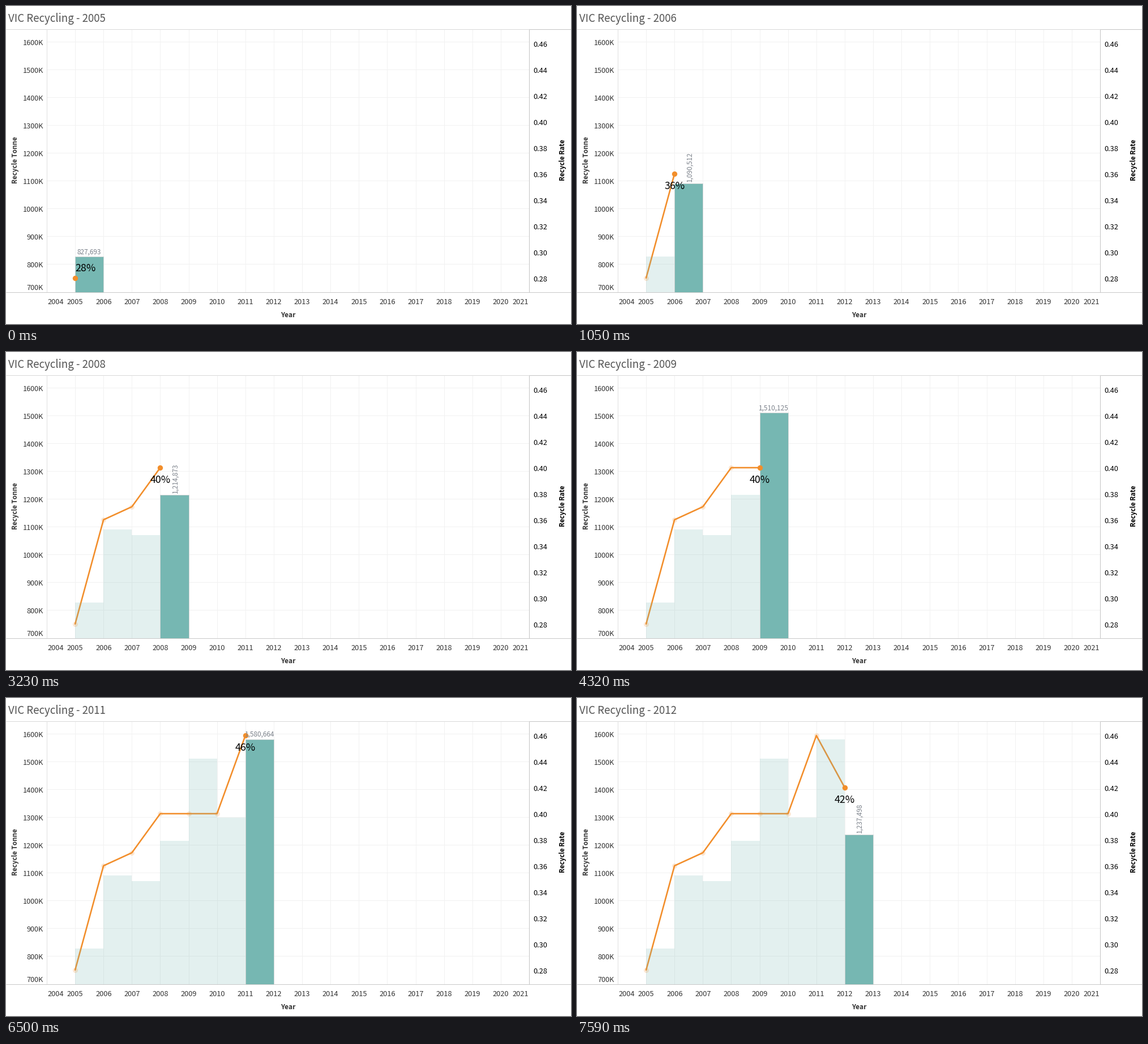
These frames come from a looping animation (998x561 px, 8000 ms). A matplotlib script:

```python
import matplotlib.pyplot as plt
from matplotlib.animation import FuncAnimation
from matplotlib.patches import Rectangle

W, H, DPI = 998, 561, 100
PT = 72 / DPI                      # points per pixel
STEP, LOOP = 20, 8000              # ms
FIRST_HOLD, HOLD = 1050, 1090      # ms each year stays
LEFT, RIGHT, TOP, BASE = 72, 924, 40.5, 504.5
START, END = 2004, 2021

TEAL, ORANGE = "#76b7b2", "#f28e2b"
FONT = "Noto Sans CJK JP"

TONNES = [827693, 1090512, 1069807, 1214873,
          1510125, 1299382, 1580664, 1237498]
RATES = [28, 36, 37, 40, 40, 40, 46, 42]
FIRST_YEAR = 2005


def year_x(year):
    return LEFT + (year - START) * (RIGHT - LEFT) / (END - START)


def tonne_y(tonnes):
    return BASE - (tonnes - 700000) / 100000 * 49.04


def rate_y(percent):
    return 479.7 - (percent - 28) * 22.97


fig = plt.figure(figsize=(W / 100, H / 100), dpi=DPI, facecolor="white")
ax = fig.add_axes([0, 0, 1, 1])
ax.set_xlim(0, W)
ax.set_ylim(H, 0)
ax.axis("off")


def rule(x0, y0, x1, y1, color, z=0):
    ax.plot([x0, x1], [y0, y1], color=color, lw=PT, zorder=z,
            solid_capstyle="butt")


def place(artist, x, y, upright=False):
    """Centre the digit height of a text on (x, y)."""
    drop = 0.37 * artist.get_fontsize() / PT
    artist.set_position((x + drop, y) if upright else (x, y + drop))
    artist.set_rotation(90 if upright else 0)


def label(x, y, text, size, color="#333333", ha="center", weight="medium",
          upright=False, z=6):
    artist = ax.text(0, 0, text, fontsize=size * PT, color=color, ha=ha,
                     va="baseline", family=FONT, weight=weight,
                     rotation_mode="anchor", zorder=z)
    place(artist, x, y, upright)
    return artist


# Grid and frame
for k in range(800, 1601, 100):
    rule(LEFT, tonne_y(k * 1000), RIGHT, tonne_y(k * 1000), "#f1f1f1")
for year in range(START + 1, END):
    rule(year_x(year), TOP, year_x(year), BASE, "#f1f1f1")
rule(0, TOP, RIGHT, TOP, "#d9d9d9", 1)
rule(RIGHT, TOP, W, TOP, "#c4c4c4", 1)
rule(LEFT, TOP, LEFT, BASE, "#dedede", 1)
rule(RIGHT, TOP, RIGHT, BASE, "#c4c4c4", 1)
rule(0, BASE, W, BASE, "#c8c8c8", 5)

# Axis text
for k in range(700, 1601, 100):
    y = 496.5 if k == 700 else tonne_y(k * 1000) + 1.3
    label(66, y, f"{k}K", 12.7, ha="right")
for percent in range(28, 47, 2):
    label(931, rate_y(percent) + 1.2, f"{percent / 100:.2f}", 12.8,
          "black", ha="left")
for year in range(START, END + 1):
    shift = {START: 15.3, END: -15.3}.get(year, 0)
    label(year_x(year) + shift, 521, str(year), 12.8)
label(498, 545, "Year", 12, weight="bold")
label(16, 272, "Recycle Tonne", 11.6, weight="bold", upright=True)
label(982.5, 271.5, "Recycle Rate", 11.6, "black", weight="bold",
      upright=True)

# Moving parts
title = label(4, 21, "", 18.7, "#555555", ha="left", weight="light")
count = label(0, 0, "", 11.8, "#7d838c", weight="light", z=7)
share = label(0, 0, "", 17.8, "black", weight="light", z=8)

xs = [year_x(FIRST_YEAR + i) for i in range(len(RATES))]
ys = [rate_y(r) for r in RATES]
trail, = ax.plot([], [], color=ORANGE, lw=2.6 * PT, zorder=2,
                 solid_joinstyle="round", solid_capstyle="round")
bars = [ax.add_patch(Rectangle((x, tonne_y(t)), year_x(1) - year_x(0),
                               BASE - tonne_y(t), lw=PT, zorder=3))
        for x, t in zip(xs, TONNES)]
old_dots, = ax.plot([], [], "o", color=ORANGE, ms=9 * PT, mew=0,
                    alpha=0.2, zorder=4)
dot, = ax.plot([], [], "o", color=ORANGE, ms=9.4 * PT, mew=0, zorder=6)


def current_index(t):
    if t + STEP <= FIRST_HOLD:
        return 0
    return min(1 + (t + STEP // 2 - FIRST_HOLD) // HOLD, len(RATES) - 1)


def update(frame):
    now = current_index(frame * STEP)
    x, y, tonnes = xs[now], ys[now], TONNES[now]
    top = tonne_y(tonnes)

    for i, bar in enumerate(bars):
        bar.set_visible(i <= now)
        bar.set_facecolor(TEAL if i == now else (TEAL, 0.2))
        bar.set_edgecolor("#ccd3d3" if i == now else "none")
        bar.set_zorder(3.5 if i == now else 3)

    trail.set_data(xs[:now + 1], ys[:now + 1])
    old_dots.set_data(xs[:now], ys[:now])
    dot.set_data([x], [y])

    title.set_text(f"VIC Recycling - {FIRST_YEAR + now}")
    share.set_text(f"{RATES[now]}%")
    # The lowest point has no room beneath it
    place(share, *((x + 18, y - 18) if now == 0 else (x, y + 20)))

    count.set_text(f"{tonnes:,}")
    mid = x + 25
    if 1000000 <= tonnes < 1500000:
        place(count, mid + 0.5, top - 29, upright=True)
    else:
        place(count, mid, top - 9)
    return [*bars, trail, old_dots, dot, title, share, count]


anim = FuncAnimation(fig, update, frames=LOOP // STEP, interval=STEP,
                     init_func=lambda: update(0), repeat=True,
                     repeat_delay=0, blit=False)
plt.show()
```
